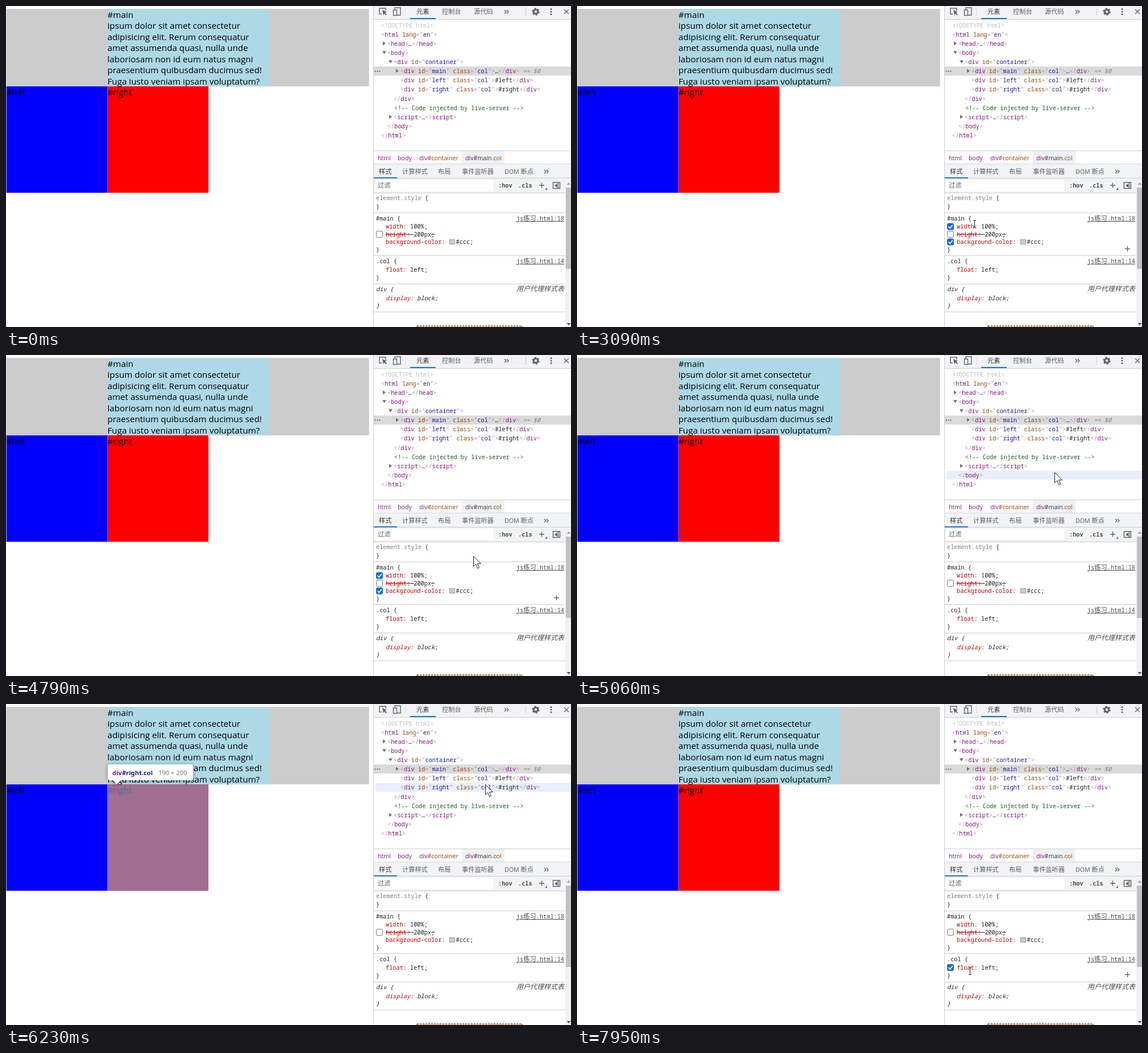
Animation, 994 px wide and 564 px high, one loop 8000 ms. Source, as an HTML page:

```html
<!DOCTYPE html>
<html lang="zh">
<head>
<meta charset="utf-8">
<style>
html, body { margin: 0; width: 100%; height: 100%; overflow: hidden; background: #fff; }
svg { display: block; width: 994px; height: 564px; }
text { white-space: pre; }
.page { font: 15.2px "Open Sans", "Noto Sans", sans-serif; }
.code { font: 10.25px "Noto Sans Mono", "Noto Sans CJK SC", monospace; fill: #222; }
.ui { font: 10.7px "Open Sans", "Noto Sans CJK SC", sans-serif; fill: #5a5e62; }
.cjk { font-size: 11.2px; }
.tip { font: 11.2px "Noto Sans", sans-serif; fill: #777; }
.on { fill: #333; }
.bracket { fill: #a894a6; }
.name { fill: #881280; }
.attr { fill: #994500; }
.value { fill: #1a1aa6; }
.comment { fill: #1d5f20; }
.pale { fill: #c0c0c0; }
.grey { fill: #808080; }
.prop { fill: #c80000; }
.soft { fill: #4a4a4a; }
.italic { font-style: italic; }
.bold { font-weight: 700; }
.strike { text-decoration: line-through #222; }
.link { text-decoration: underline; }
.end { text-anchor: end; }
.icon { fill: none; stroke: #5f6368; stroke-width: 1.4; }
</style>
</head>
<body>
<svg id="stage" viewBox="0 0 994 564"></svg>
<script>
const rect = (x, y, w, h, fill, extra = '') =>
  `<rect x="${x}" y="${y}" width="${w}" height="${h}" fill="${fill}" ${extra}/>`;
const path = (d, extra) => `<path d="${d}" ${extra}/>`;
const icon = d => path(d, 'class="icon"');
const group = (id, content) => `<g id="${id}">${content}</g>`;
const span = (cls, s) => `<tspan class="${cls}">${s.replace(/</g, '&lt;')}</tspan>`;
// y is the middle of the text line; baselines sit on whole pixels
const text = (x, y, content, cls = 'code', shift = 3.7) =>
  `<text x="${x}" y="${Math.round(y + shift)}" class="${cls}">${content}</text>`;

const markup = s => s.replace(/(<\/?)(\w+)((?: \w+="\w+")*)>|([^<]+)/g,
  (_, open, name, attrs, plain) => plain ? span('', plain) :
    span('bracket', open) + span('name', name) +
    attrs.replace(/(\w+)="(\w+)"/g, (_, key, value) =>
      span('attr', key) + span('bracket', '="') + span('value', value) + span('bracket', '"')) +
    span('bracket', '>'));

const ROW_TOP = 25.8, ROW_HEIGHT = 16.13;
const rows = [
  [660, span('pale', '<!DOCTYPE html>')],
  [660, markup('<html lang="en">')],
  [671, markup('<head>…</head>'), 'closed'],
  [671, markup('<body>'), 'open'],
  [682, markup('<div id="container">'), 'open'],
  [694, markup('<div id="main" class="col">…</div>') + span('grey italic', ' == $0'), 'closed'],
  [694, markup('<div id="left" class="col">#left</div>')],
  [694, markup('<div id="right" class="col">#right</div>')],
  [682, markup('</div>')],
  [683, span('comment', '<!-- Code injected by live-server -->')],
  [682, markup('<script>…<\/script>'), 'closed'],
  [671, markup('</body>')],
  [660, markup('</html>')]
];
const lorem = ['#main', 'ipsum dolor sit amet consectetur', 'adipisicing elit. Rerum consequatur',
  'amet assumenda quasi, nulla unde', 'laboriosam non id eum natus magni',
  'praesentium quibusdam ducimus sed!', 'Fuga iusto veniam ipsam voluptatum?'];

const boxes = {
  main: [.7, 5, 638, 136.2],
  left: [.7, 141.2, 177.8, 187],
  right: [178.5, 141.2, 177.6, 187]
};

function webPage() {
  return rect(...boxes.main, '#ccc') + rect(178.5, 5, 283.5, 136.2, 'lightblue') +
    rect(...boxes.left, '#00f') + rect(...boxes.right, '#f00') +
    lorem.map((line, i) => text(178.5, 16 + 19.45 * i, line, 'page', 5)).join('') +
    text(.7, 152, '#left', 'page', 5) + text(178.5, 152, '#right', 'page', 5);
}

function tooltip(id, x, top, width, size, sizeX, arrow) {
  return group('tip-' + id, `<g style="filter:drop-shadow(0 1px 3px #0006)">` +
    rect(x, top, width, 28, '#fff', 'rx="3"') + path(arrow, 'fill="#fff"') + '</g>' +
    text(x + 8, top + 15, span('name', 'div') + span('value', `#${id}.col`), 'tip bold') +
    text(sizeX, top + 15, size, 'tip'));
}

function elementsPanel() {
  const lines = rows.map(([x, content, arrow], i) => {
    const y = ROW_TOP + ROW_HEIGHT * (i + .5);
    const mark = arrow === 'closed' ? `M${x - 8} ${y - 4}l5 3.5l-5 3.5z`
      : arrow ? `M${x - 9} ${y - 3}h7l-3.5 5z` : '';
    return path(mark, 'fill="#6e6e6e"') + text(x, y, content);
  });
  const dots = [649.5, 653.5, 657.5].map(x => `<circle cx="${x}" cy="114.5" r="1.1" fill="#555"/>`);
  return rect(650, 0, 344, 15.6, '#e8eefb', 'id="rowHover" rx="2"') +
    rect(647, 106.3, 347, 16, '#dadada') + dots.join('') + lines.join('');
}

function toolbars() {
  const label = (x, y, s, cls = '') => text(x, y, s, 'ui cjk ' + cls);
  const more = (x, y) => icon(`M${x} ${y - 3}l3 3l-3 3m4-6l3 3l-3 3`);
  return rect(647, 0, 347, 23, '#f1f3f4') + rect(647, 23, 347, 1, '#ccc') +
    rect(711, 21, 45, 2, '#1a73e8') +
    icon('M661 14H657V4H668V8') + path('M662 7l8 3.5l-3 1.200l3 3l-1.500 1.500l-3-3l-1.500 3z', 'fill="#5f6368"') +
    icon('M684 6V3H694V16H688M681.5 7H687.5V16.500H681.5Z') +
    rect(702, 3, 1, 14, '#ddd') + rect(914, 3, 1, 14, '#ccc') +
    label(722, 10, '元素', 'on') + label(767, 10, '控制台') + label(823, 10, '源代码') + more(877, 10) +
    '<circle cx="932" cy="10" r="3.7" fill="none" stroke="#5f6368" stroke-width="3"/>' +
    '<circle cx="932" cy="10" r="5.7" fill="none" stroke="#5f6368" stroke-width="2" stroke-dasharray="2.98"/>' +
    [5.5, 10, 14.5].map(y => `<circle cx="959" cy="${y}" r="1.5" fill="#5f6368"/>`).join('') +
    icon('M982 6l8 8m0-8l-8 8') +

    rect(647, 254, 347, 1, '#ccc') + rect(802, 255, 75, 22, '#eef1f2') +
    text(654, 267, span('name', 'html'), 'ui') + text(689, 267, span('name', 'body'), 'ui') +
    text(727, 267, span('name', 'div') + span('attr', '#container'), 'ui') +
    text(808, 267, span('name', 'div') + span('on', '#main') + span('attr', '.col'), 'ui') +

    rect(647, 277, 347, 51, '#f1f3f4') + rect(647, 277, 347, 1, '#d5d7d9') +
    rect(647, 302, 347, 1, '#ccc') + rect(647, 301, 41, 2, '#1a73e8') +
    label(656, 291, '样式', 'on') + label(697, 291, '计算样式') + label(760, 291, '布局') +
    label(802, 291, '事件监听器') + text(877, 291, 'DOM <tspan class="cjk">断点</tspan>', 'ui') + more(947, 291) +

    rect(649, 305, 208, 20, '#fff') + label(654, 315, '过滤') + rect(647, 328, 347, 1, '#ccc') +
    text(866, 315, ':hov', 'code bold soft') + text(901, 315, '.cls', 'code bold soft') +
    icon('M938 315h9m-4.500-4.500v9M962.5 310h12v10.500h-12zM971.500 310v10') +
    path('M952 319v4h-4zM970 312v7l-5-3.500z', 'fill="#5f6368"');
}

function checkbox(y, checked) {
  return rect(651.5, y - 5.5, 11, 11, checked ? '#0b6fe0' : '#fff',
    `rx="2" stroke="${checked ? '#0b6fe0' : '#767676'}"`) +
    (checked ? path(`M653.500 ${y}l2.700 2.800l4.500-5.500`, 'fill="none" stroke="#fff" stroke-width="1.8"') : '');
}

function stylesPanel() {
  const rule = (y, s, cls = 'code') => text(651, y, s, cls);
  const prop = (y, name, value, cls = '') => text(668, y, span('prop', name) + ': ' + value, 'code ' + cls);
  const source = (y, line) =>
    text(982, y, `js<tspan class="cjk">练习</tspan>.html:${line}`, 'code link end soft');
  const plus = y => icon(`M964 ${y}h9m-4.500-4.500v9`);
  return [363, 438, 488, 537].map(y => rect(647, y, 338, 1, '#ccc')).join('') +
    rule(337, span('grey', 'element.style') + ' {') + rule(352, '}') +
    rule(373, '#main {') + source(373, 18) + prop(387.5, 'width', '100%;') +
    text(668, 401, span('prop strike', 'height') + span('strike', ': ') + '200px' + span('strike', ';')) +
    prop(414.5, 'background-color', '') + text(791.5, 414.5, '#ccc;') +
    rect(780.5, 410.5, 9, 8, '#ccc', 'stroke="#999"') + rule(428, '}') + checkbox(401, false) +
    rule(448, '.col {') + source(448, 14) + prop(463, 'float', 'left;') + rule(477, '}') +
    rule(497, 'div {', 'code italic') + prop(513, 'display', 'block;', 'italic') + rule(526, '}', 'code italic') +
    `<text x="982" y="501" class="code italic end soft" style="font-size:12px">用户代理样式表</text>` +
    group('zone-main', checkbox(387.5, true) + checkbox(414.5, true) + plus(426.5)) +
    group('zone-col', checkbox(463, true) + plus(475.5)) +
    rect(723, 562, 185, 4, '#f9cc9d', 'stroke="#222" stroke-dasharray="3 2"') +
    rect(984, 306, 10, 258, '#f1f1f1') + rect(985, 319, 9, 143, '#c1c1c1') +
    path('M986.500 314h7l-3.500-4z', 'fill="#a3a3a3"') + path('M986.500 557h7l-3.500 4z', 'fill="#505050"');
}

const $ = id => document.getElementById(id);
$('stage').innerHTML = webPage() +
  Object.keys(boxes).map(id => group('glow-' + id, rect(...boxes[id], '#6fa8dc', 'opacity=".66"'))).join('') +
  tooltip('main', 1, 150, 169, '682.4 × 145.6', 92, 'M9 151l8-8l8 8z') +
  tooltip('left', 1, 106, 142, '190 × 200', 83, 'M9 133l8 8l8-8z') +
  tooltip('right', 179, 106, 150, '190 × 200', 268, 'M187 133l8 8l8-8z') +
  rect(646, 0, 1, 564, '#ccc') + elementsPanel() + toolbars() + stylesPanel() +
  group('cursor',
    path('M0 0V18L4.200 14L7.200 21.500L10 20.300L7 13.200H13Z', 'id="arrow" fill="#fff" stroke="#223"') +
    path('M-2.500-6H2.500M0-6V6M-2.500 6H2.500', 'id="beam" fill="none" stroke="#222"'));

const LOOP = 8000;
// time, x, y of the pointer
const track = [
  [390, 745, 530], [600, 715, 470], [780, 690, 420], [1090, 662, 376], [2080, 662, 376],
  [2220, 677, 376], [3020, 677, 376], [3090, 699, 382], [3300, 712, 440], [3480, 700, 488],
  [3790, 660, 450], [4789, 660, 450], [4790, 822, 354], [4860, 828, 310], [5000, 838, 230],
  [5200, 844, 150], [5340, 842, 110], [5600, 842, 112], [5700, 843, 127], [5970, 843, 143],
  [6200, 843, 143], [6370, 843, 130], [6560, 843, 130], [6770, 843, 142], [6900, 843, 142],
  [6970, 843, 123.5], [7040, 843, 123.5], [7110, 842, 114], [7300, 842, 114], [7390, 830, 200],
  [7530, 780, 360], [7740, 712, 476], [7950, 691, 469], [LOOP, 691, 469]
];
// style rule under the pointer, and the rule whose matches are lit
const zones = [[0, ''], [580, 'col'], [740, 'main'], [3300, 'col'], [4790, 'main'], [4860, ''],
  [7550, 'main'], [7670, 'col']];
const selectors = [[0, ''], [1360, 'main'], [3090, ''], [4000, 'col'], [4790, '']];
const stateAt = (list, t) => list.filter(([start]) => start <= t).pop()[1];

function pointerAt(t) {
  const next = track.findIndex(key => key[0] > t);
  if (next < 1) return null;
  const [t0, x0, y0] = track[next - 1], [t1, x1, y1] = track[next];
  const k = (t - t0) / (t1 - t0);
  return [x0 + (x1 - x0) * k, y0 + (y1 - y0) * k];
}

const show = (id, visible) => { $(id).style.display = visible ? '' : 'none'; };

function draw(now) {
  const t = now % LOOP;
  const pointer = pointerAt(t);
  const [x, y] = (pointer || [0, 999]).map(Math.round);
  const beam = x < 750 && y > 366 && y < 488;
  show('cursor', pointer);
  show('beam', beam);
  show('arrow', !beam);
  $('cursor').setAttribute('transform', `translate(${x + .5} ${y + .5})`);

  const row = Math.floor((y - ROW_TOP) / ROW_HEIGHT);
  show('rowHover', rows[row]);
  $('rowHover').setAttribute('y', ROW_TOP + row * ROW_HEIGHT);

  const lit = stateAt(selectors, t) || { 5: 'main', 6: 'left', 7: 'right' }[row];
  for (const id in boxes) {
    show('glow-' + id, lit === id || lit === 'col');
    show('tip-' + id, lit === id);
  }
  const zone = stateAt(zones, t);
  show('zone-main', zone === 'main');
  show('zone-col', zone === 'col');
  requestAnimationFrame(() => draw(performance.now() - start));
}
const start = performance.now();
draw(0);
</script>
</body>
</html>
```
